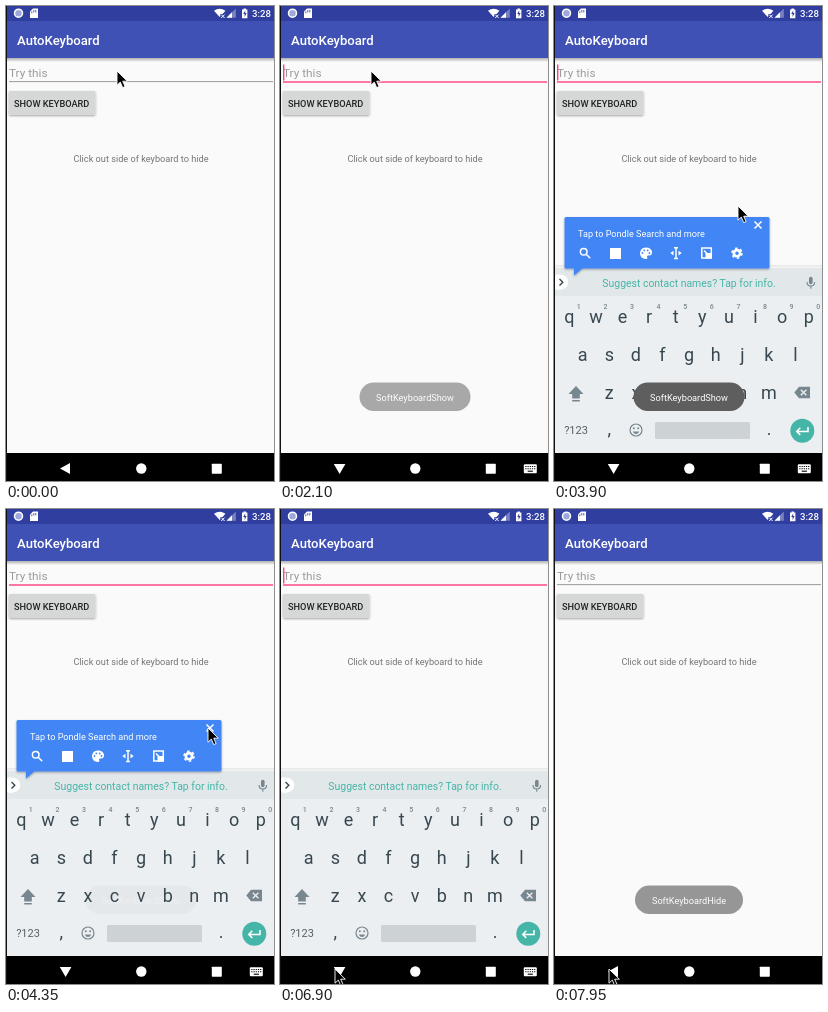
Recreate the animation shown at these times as an HTML page. Size 268 by 475 pixels, loop 8 s.

```html
<!DOCTYPE html>
<html lang="en">
<head>
<meta charset="utf-8">
<style>
html, body { margin: 0; width: 100%; height: 100%; overflow: hidden; background: #fafafa; }
svg { display: block; width: 268px; height: 475px; font-family: Roboto, "Noto Sans", sans-serif; }
.mid { text-anchor: middle; }
.bold { font-weight: 500; }
.line { fill: none; stroke: #fff; stroke-width: 1.5; }
</style>
</head>
<body>
<svg viewBox="0 0 268 475" xmlns="http://www.w3.org/2000/svg">
  <defs>
    <linearGradient id="shade" x2="0" y2="1">
      <stop offset="0" stop-color="#000" stop-opacity=".3"/>
      <stop offset="1" stop-color="#000" stop-opacity="0"/>
    </linearGradient>
    <filter id="lift" x="-10%" y="-20%" width="120%" height="150%">
      <feDropShadow dx="0" dy="1" stdDeviation=".9" flood-opacity=".35"/>
    </filter>
    <clipPath id="content"><rect width="268" height="447"/></clipPath>
  </defs>

  <rect width="268" height="475" fill="#fafafa"/>
  <rect y="52" width="268" height="4" fill="url(#shade)"/>
  <rect y="15" width="268" height="37" fill="#3f51b5"/>
  <rect width="268" height="15" fill="#303f9f"/>
  <text class="bold" x="11" y="38.5" font-size="13.1" fill="#fff">AutoKeyboard</text>

  <g id="status" fill="#fff">
    <circle cx="12.5" cy="7.2" r="4" fill="#9fa8da" stroke="#fff" stroke-width="1.5"/>
    <path d="M27 2.5h5v9.5h-8v-6.5z"/>
    <path d="M25.8 5.3v2M27.8 4v2.5M29.8 4v2.5" stroke="#303f9f" stroke-width=".8"/>
    <path d="M208 4.8q5.7-4 11.4 0l-2.8 3.2h-2.3v2.3l-.6.8z"/>
    <path d="M215.2 8.6l3.4 3.4M218.6 8.6l-3.4 3.4" stroke="#fff"/>
    <path d="M220.5 11.8l9.3-9.3v9.3z" fill-opacity=".35"/>
    <path d="M220.5 11.8l5.5-5.5v5.5z"/>
    <path d="M236 3.4h1.5v-1h2.4v1h1.5v8.8h-5.4z"/>
    <path d="M239.2 4.5l-2 3.6h1.4v2.8l2-3.8h-1.4z" fill="#303f9f"/>
    <text class="bold" x="246" y="11" font-size="9.6">3:28</text>
  </g>

  <text x="3" y="71" font-size="11.8" fill="#9c9c9c">Try this</text>
  <rect id="underline" x="3" width="264"/>
  <rect id="caret" x="3" y="58.5" width="1.4" height="16" fill="#ff4081"/>

  <rect x="3" y="85" width="86.5" height="24" rx="1.4" fill="#d6d7d7" filter="url(#lift)"/>
  <text class="bold" x="8" y="100.5" font-size="9.2" fill="#212121">SHOW KEYBOARD</text>
  <text class="mid" x="135" y="155.5" font-size="9.2" fill="#757575">Click out side of keyboard to hide</text>

  <g clip-path="url(#content)">
    <g id="keyboard">
      <rect y="259" width="268" height="4" fill="url(#shade)" opacity=".25"/>
      <rect y="262" width="268" height="190" fill="#eceff1"/>
      <rect y="262" width="268" height="28" fill="#e2e7e9"/>
      <path d="M0 270a7 7 0 0 1 7-1.2a7.3 7.3 0 0 1 0 14.6a7 7 0 0 1-7-1.2z" fill="#fff"/>
      <path d="M5.5 273l3.3 3.3-3.3 3.3" fill="none" stroke="#37474f" stroke-width="1.4"/>
      <text class="mid" x="135" y="280.5" font-size="10.45" fill="#45b5a8">Suggest contact names? Tap for info.</text>
      <g fill="#78878f">
        <rect x="255" y="270.8" width="3.6" height="7.4" rx="1.8"/>
        <path d="M253 276q0 4 3.8 4t3.8-4M256.8 280v2.8" fill="none" stroke="#78878f" stroke-width="1.1"/>
      </g>
      <g id="letters" class="mid" font-size="18" fill="#37474f"></g>
      <g id="digits" class="mid bold" font-size="7" fill="#78878f"></g>
      <g fill="#78878f">
        <path d="M22 380l7.5 8h-3.7v4.5h-7.6v-4.5h-3.7zM18.2 394h7.6v1.6h-7.6z"/>
        <path d="M245 380.8h11v11.4h-11l-4.7-5.7z"/>
        <path d="M246.8 383.7l5.6 5.6M252.4 383.7l-5.6 5.6" stroke="#eceff1" stroke-width="1.3"/>
        <circle cx="82" cy="424" r="6" fill="none" stroke="#78878f" stroke-width="1.2"/>
        <circle cx="79.8" cy="422.3" r="1"/><circle cx="84.2" cy="422.3" r="1"/>
        <path d="M78.8 425.5h6.4q-1 2.6-3.2 2.6t-3.2-2.6z"/>
      </g>
      <text class="mid" x="22" y="428" font-size="11" fill="#546067">?123</text>
      <rect x="101" y="416" width="95" height="17" rx="1.5" fill="#cdd2d4"/>
      <circle cx="248.3" cy="424.8" r="12" fill="#45b5a8"/>
      <path d="M254 421v4.4h-11M246.3 421.8l-3.6 3.6 3.6 3.6" fill="none" stroke="#fff" stroke-width="1.5"/>
    </g>

    <g id="tip">
      <path d="M12 211h202q1.5 0 1.5 1.5v48.5q0 1.5-1.5 1.5h-185.500l-8.500 7v-7h-8q-1.500 0-1.500-1.500v-48.500q0-1.500 1.500-1.500z" fill="#4285f4" filter="url(#lift)"/>
      <text x="24" y="230.5" font-size="9.15" fill="#fff">Tap to Pondle Search and more</text>
      <path class="line" stroke-width="1.3" d="M200.500 215.500l7 7M207.500 215.500l-7 7"/>
      <circle class="line" cx="29.700" cy="245.700" r="3.300"/>
      <path class="line" d="M32.200 248.200l4 4"/>
      <rect x="56" y="242" width="11" height="11" fill="#fff"/>
      <path d="M92 241.500c-8 0-8 11.500 0 11.500c2 0 1.200-1.700 1-2.300c0-1 .8-1.200 2-1.200c5 0 4-8-3-8z" fill="#fff"/>
      <g fill="#4285f4">
        <circle cx="88.500" cy="247" r=".9"/><circle cx="90.300" cy="244.400" r=".9"/>
        <circle cx="93.700" cy="244.400" r=".9"/><circle cx="95.500" cy="247" r=".9"/>
      </g>
      <path class="line" d="M122 241.800v10.700M120 241.800h4M120 252.500h4"/>
      <path d="M119.500 244.800v4.600l-3.200-2.300zM124.500 244.800v4.600l3.200-2.300z" fill="#fff"/>
      <rect class="line" x="147.800" y="242" width="9.500" height="10"/>
      <path d="M151.500 247h6v5.500h-6z" fill="#fff"/>
      <path class="line" stroke-width="1.2" d="M150 244.500l3 3"/>
      <circle cx="183" cy="247.200" r="3.100" fill="none" stroke="#fff" stroke-width="2.600"/>
      <circle cx="183" cy="247.200" r="5" fill="none" stroke="#fff" stroke-width="1.600" stroke-dasharray="2.600 2.636"/>
    </g>
  </g>

  <rect y="447" width="268" height="28"/>
  <g fill="#fff">
    <path id="back"/>
    <circle cx="135.300" cy="462.500" r="5.200"/>
    <rect x="205.800" y="457.700" width="10" height="10" rx=".6"/>
    <g id="imeKey">
      <rect x="243.800" y="458.200" width="13" height="9" rx="1"/>
      <path d="M245.300 460.500h10M245.300 462.700h10" stroke="#000" stroke-width="1.100" stroke-dasharray="1.200 1"/>
      <path d="M247.700 465.200h5.200" stroke="#000" stroke-width="1.100"/>
    </g>
  </g>
  <rect width="1" height="475" fill="#111"/>

  <g id="toast">
    <rect id="pill" y="376.500" height="28.500" rx="14.250" fill="#5e5e5e"/>
    <text id="message" class="mid" x="135" y="394.500" font-size="9.2" fill="#fff"></text>
  </g>
  <path id="cursor" d="M0 0v14.200l3.300-3.100 2.400 5.500 2.400-1-2.400-5.400h4.600z" fill="#000" stroke="#fff" stroke-width=".9"/>
</svg>
<script>
const LOOP = 8000, STEP = 150;
const $ = id => document.getElementById(id);
const clamp = v => Math.max(0, Math.min(1, v));
const ramp = (t, from, to) => clamp((t - from) / (to - from));
const set = (id, attrs) => {
  for (const name in attrs) $(id).setAttribute(name, attrs[name]);
};

const label = (parent, text, x, y) => {
  const el = document.createElementNS("http://www.w3.org/2000/svg", "text");
  el.textContent = text;
  el.setAttribute("x", x);
  el.setAttribute("y", y);
  $(parent).append(el);
};
const PITCH = 26.6;
const row = (parent, chars, x, y) =>
  [...chars].forEach((c, i) => label(parent, c, x + i * PITCH, y));
row("letters", "qwertyuiop", 15.3, 317);
row("digits", "1234567890", 24.8, 302.5);
row("letters", "asdfghjkl", 28.7, 355);
row("letters", "zxcvbnm", 55.3, 393);
label("letters", ",", 55.3, 429);
label("letters", ".", 215, 429);

// Pointer positions: time, x, y
const path = [
  [0, 111, 65], [1050, 98, 69], [1200, 82, 71], [1350, 74, 68], [1500, 91, 65],
  [3150, 105, 88], [3300, 136, 140], [3450, 154, 166],
  [3750, 166, 180], [3900, 184, 200], [4050, 200, 217], [4200, 202, 219],
  [5250, 224, 243], [5400, 246, 272], [5700, 248, 294], [5850, 257, 386],
  [6150, 152, 426], [6450, 122, 440], [6600, 85, 453], [6750, 62, 460], [6900, 55, 460]
];

function toastAlpha(t) {
  if (t >= 7700) return ramp(t, 7700, 8090);
  if (t >= 4350) return t < 5700 ? 0.04 : 0;
  return Math.min(ramp(t, 1940, 2250), 1 - ramp(t, 3900, 4360));
}

function draw(time) {
  const t = Math.floor(time / STEP) * STEP;
  const focused = t >= 1950 && t < 7800;
  const imeOpen = t >= 2100 && t < 7200;
  const blinkOn = Math.floor((t - 1800) / 500) % 2 === 0;

  set("underline", focused
    ? { y: 75.3, height: 1.4, fill: "#ff4081" }
    : { y: 75.2, height: 0.9, fill: "#8f8f8f" });
  set("caret", { opacity: focused && blinkOn ? 1 : 0 });

  const shown = t < 5000 ? ramp(t, 2100, 2500) : 1 - ramp(t, 7080, 7480);
  set("keyboard", {
    opacity: shown,
    transform: `translate(0 ${37 * (1 - shown) ** 2})`
  });
  set("tip", { opacity: Math.min(ramp(t, 2350, 2600), 1 - ramp(t, 4700, 4900)) });

  set("back", { d: imeOpen ? "M53.800 458h11.600l-5.800 10z" : "M54 462.500l10-5.600v11.200z" });
  set("imeKey", { opacity: imeOpen ? 1 : 0 });

  const hiding = t > 6000;
  const width = hiding ? 108 : 111;
  set("toast", { opacity: toastAlpha(t) });
  set("pill", { x: 135 - width / 2, width });
  $("message").textContent = hiding ? "SoftKeyboardHide" : "SoftKeyboardShow";

  const [, x, y] = path.filter(p => p[0] <= t).pop();
  set("cursor", { transform: `translate(${x} ${y})` });
}

const start = performance.now();
function tick() {
  draw((performance.now() - start) % LOOP);
  requestAnimationFrame(tick);
}
tick();
</script>
</body>
</html>
```
